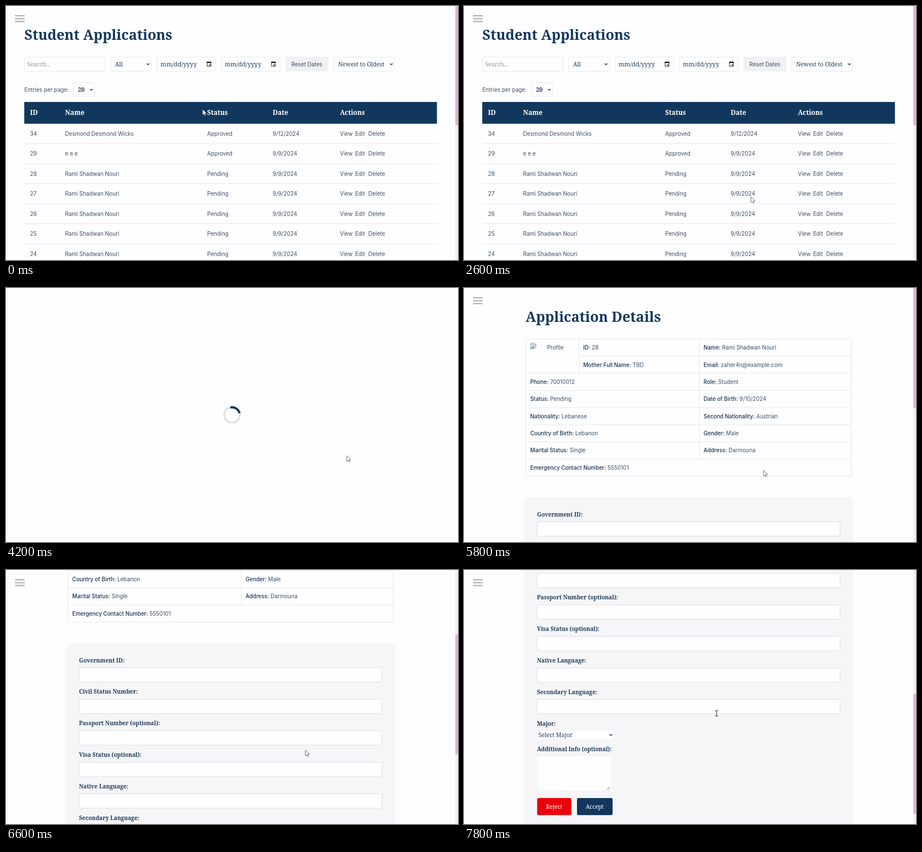
An HTML page for the animation above (8000 ms loop, 800 by 450 pixels).

```html
<!DOCTYPE html>
<html lang="en">
<head>
<meta charset="utf-8">
<title>Student Applications</title>
<style>
  html, body { margin: 0; width: 100%; height: 100%; overflow: hidden; background: #fefdff; }
  svg { display: block; width: 800px; height: 450px; }
  text { white-space: pre; }
  .sans { font: 400 9.75px Inter, sans-serif; fill: #3a5069; }
  .key { font-weight: 500; font-size: 9.7px; fill: #173352; }
  .serif { font: 400 10.25px "Noto Serif", serif; fill: #1f3e5f; }
  .title { font: 700 24.7px "Noto Serif", serif; fill: #12375e; }
  .head { font: 700 11.7px "Noto Serif", serif; fill: #fff; }
  .label { font: 700 9.92px "Noto Serif", serif; fill: #1f3e5b; }
  .hint { fill: #8f949c; }
  .date { font-size: 10.8px; }
  .count { font-weight: 600; font-size: 10.3px; }
  .button { font-size: 10px; font-weight: 500; fill: #fff; }
  .box { fill: #fefdff; stroke: #e9e8ec; }
  .field { fill: #fefdff; stroke: #e0dfe4; }
  .rule { stroke: #e8e7ec; fill: none; }
  .chevron { fill: none; stroke: #24364a; stroke-width: 1.3; }
  #panel { filter: drop-shadow(0 0 3px rgba(0, 0, 0, .1)); }
</style>
</head>
<body>
<svg id="stage" viewBox="0 0 800 450">
  <rect width="800" height="450" fill="#fefdff"/>
  <g id="list"></g>
  <g id="details"></g>
  <g id="chrome">
    <path d="M16 17.2H33M16 22.4H33M16 27.6H33" stroke="#b9b9bc" stroke-width="2.5"/>
    <rect x="795" width="5" height="450" fill="#f1f0f3"/>
    <rect id="thumb" x="795.3" width="4.7" rx="1.5" fill="#e4b1da"/>
  </g>
  <g id="loader" fill="none" stroke-width="3.8">
    <circle cx="400" cy="225" r="13.7" stroke="#e3e2e5"/>
    <path id="arc" d="M390.31 215.31A13.7 13.7 0 0 1 409.69 215.31" stroke="#0f365c"/>
  </g>
  <path id="arrow" d="M0 0V10.2L2.4 8.1L4 11.6L5.6 10.9L4.1 7.6H7.3Z" fill="#fff" stroke="#55555c" stroke-width=".8"/>
  <path id="beam" d="M-2.8 -4.8H-.8L0 -4.2L.8 -4.8H2.8M0 -4.2V4.2M-2.8 4.8H-.8L0 4.2L.8 4.8H2.8" fill="none" stroke="#222" stroke-width="1"/>
</svg>
<script>
const LOOP = 8000, STEP = 200;
const LOAD_START = 4000, LOAD_END = 5000;
const NAVY = '#11375d';
const $ = id => document.getElementById(id);

const text = (x, y, s, cls = 'sans', more = '') => `<text x="${x}" y="${y}" class="${cls}" ${more}>${s}</text>`;
const rect = (x, y, w, h, attrs) => `<rect x="${x}" y="${y}" width="${w}" height="${h}" ${attrs}/>`;
const line = (d, cls = 'rule') => `<path d="${d}" class="${cls}"/>`;
const chevron = (x, y) => line(`M${x - 2.4} ${y - 1.2}l2.4 2.4l2.4 -2.4`, 'chevron');
const box = (x, w, y = 90.5, h = 25) => rect(x, y, w, h, 'rx="2" class="box"');
const calendar = x => `<path d="M${x + .9} 99.4h7v7.4h-7z" fill="none" stroke="#111" stroke-width=".9"/>
  <path d="M${x + .5} 99h7.8v1.9h-7.8zM${x + 1.7} 98h1v1.5h-1zM${x + 6} 98h1v1.5h-1zM${x + 4.7} 103.6h1.9v1.9h-1.9z" fill="#111"/>`;

function listPage() {
  const student = 'Rami Shadwan Nouri';
  const rows = [
    [34, 'Desmond Desmond Wicks', 'Approved', '9/12/2024'],
    [29, 'e e e', 'Approved', '9/9/2024'],
    ...[28, 27, 26, 25, 24].map(id => [id, student, 'Pending', '9/9/2024'])
  ];
  const columns = [42.5, 104.5, 356, 472, 591];
  let s = text(32.5, 59.6, 'Student Applications', 'title');
  s += box(32.5, 143) + text(37.5, 106.7, 'Search...', 'serif hint');
  s += box(185.5, 72) + text(193, 106.7, 'All', 'serif') + chevron(251.5, 103);
  for (const x of [267.5, 381.5])
    s += box(x, 103.5) + text(x + 6, 106.9, 'mm/dd/yyyy', 'serif date') + calendar(x + 87.5);
  s += rect(495, 90, 75, 26, 'rx="2" fill="#f1f0f2"') + text(505, 106.7, 'Reset Dates');
  s += box(580.5, 107) + text(588, 106.7, 'Newest to Oldest', 'serif') + chevron(682, 103);
  s += text(32.5, 152.2, 'Entries per page:');
  s += box(119.5, 37, 136, 24.5) + text(127.5, 152, '20', 'serif count') + chevron(151, 148.2);
  s += rect(32.3, 170, 730.4, 38.6, `fill="${NAVY}"`);
  ['ID', 'Name', 'Status', 'Date', 'Actions'].forEach((h, i) => s += text(columns[i], 193.2, h, 'head'));
  rows.forEach((row, r) => {
    const y = 229.8 + r * 35.45;
    row.forEach((cell, i) => s += text(columns[i], y, cell));
    s += text(591, y, 'View') + text(618, y, 'Edit') + text(641.3, y, 'Delete');
    s += line(`M32.5 ${y + 14}H762.5`);
  });
  return s;
}

function detailsPage() {
  const pitch = 30.37, top = 90.5;
  const pair = (x, row, key, value) =>
    text(x, 109.2 + row * pitch, `<tspan class="key">${key}:</tspan> ${value}`);
  const left = [['Phone', '70010012'], ['Status', 'Pending'], ['Nationality', 'Lebanese'],
    ['Country of Birth', 'Lebanon'], ['Marital Status', 'Single'], ['Emergency Contact Number', '5550101']];
  const right = [['Name', 'Rami Shadwan Nouri'], ['Email', 'zaher4n@example.com'], ['Role', 'Student'],
    ['Date of Birth', '9/10/2024'], ['Second Nationality', 'Austrian'], ['Gender', 'Male'], ['Address', 'Darmouna']];
  let s = text(109, 59.6, 'Application Details', 'title');
  for (let i = 0; i < 9; i++)
    s += line(`M${i === 1 ? 203.5 : 109.5} ${top + i * pitch}H685.5`);
  s += line(`M109.5 ${top}V333.5M685.5 ${top}V333.5M203.5 ${top}v${2 * pitch}M416.5 ${top}v${7 * pitch}`);

  // Missing-image icon with its alt text
  s += `<path d="M118 98h6.5l3 3v3l-3.5 3.5l-2.5 -1l-3.5 2z" fill="#c5d8f4" stroke="#8e959c" stroke-width=".8"/>
    <path d="M118.4 107.6l3.6 -4l2.6 2.6l-1 1l-2 -.8z" fill="#5aa65c"/><path d="M124.3 98v3.2h3.2z" fill="#fff" stroke="#8e959c" stroke-width=".6"/>`;
  s += text(161.7, 109.2, 'Profile', 'sans', 'text-anchor="middle"');
  s += pair(211, 0, 'ID', '28') + pair(211, 1, 'Mother Full Name', 'TBD');
  left.forEach(([k, v], i) => s += pair(117.3, i + 2, k, v));
  right.forEach(([k, v], i) => s += pair(424, i, k, v));

  s += rect(109.5, 373.5, 576, 545, 'id="panel" rx="4" fill="#f6f5f7"');
  ['Government ID', 'Civil Status Number', 'Passport Number (optional)', 'Visa Status (optional)',
    'Native Language', 'Secondary Language'].forEach((name, i) => {
    const y = i * 55.87;
    s += text(129.3, 404.6 + y, name + ':', 'label');
    s += rect(129.5, 414 + y, 536, 25.5, 'rx="2" class="field"');
  });
  s += text(129.3, 739.8, 'Major:', 'label') + rect(129.5, 749, 136.5, 14.5, 'fill="#fefdff"');
  s += text(131.8, 760, 'Select Major', 'serif') + chevron(260, 756.2);
  s += text(129.3, 784.8, 'Additional Info (optional):', 'label') + rect(129.5, 794, 130, 60, 'fill="#fefdff"');
  s += '<path d="M253 853.2l5 -5M256 853.2l2 -2" stroke="#55575c" stroke-width=".8"/>';
  s += rect(129.5, 868, 60.5, 30.3, 'rx="2.5" fill="#ea000c"') + text(159.7, 886.6, 'Reject', 'serif button', 'text-anchor="middle"');
  s += rect(200, 868, 63, 30.3, `rx="2.5" fill="${NAVY}"`) + text(231.3, 886.6, 'Accept', 'serif button', 'text-anchor="middle"');
  return s;
}

// Each row: time, then values
const pointer = [[0, 348, 183], [800, 418, 252], [1000, 418, 252], [2200, 506, 336], [2600, 508, 338],
  [3400, 601, 298], [4200, 603, 297], [4800, 603, 297], [5600, 530, 323], [5800, 530, 323],
  [6600, 530, 319], [6800, 526, 315], [7200, 440, 247], [7600, 447, 254], [8000, 447, 254]];
const scroll = [[0, 0], [5800, 0], [6000, 45], [6600, 241], [6800, 292], [7000, 322], [7200, 330],
  [7400, 385], [7600, 448], [7800, 464], [8000, 464]];

function at(table, t) {
  const i = Math.max(1, table.findIndex(row => row[0] >= t));
  const a = table[i - 1], b = table[i], k = (t - a[0]) / (b[0] - a[0]);
  return a.slice(1).map((v, j) => v + (b[j + 1] - v) * k);
}

const show = (id, on) => $(id).setAttribute('display', on ? 'inline' : 'none');
const move = (id, x, y) => $(id).setAttribute('transform', `translate(${x} ${y})`);

function draw(t) {
  const loading = t >= LOAD_START && t < LOAD_END;
  const opened = t >= LOAD_END;
  const [x, y] = at(pointer, t);
  const [top] = at(scroll, t);
  show('list', t < LOAD_START);
  show('details', opened);
  show('chrome', !loading);
  show('loader', loading);
  show('beam', t >= 7600);
  show('arrow', t < 7600);
  move('details', 0, -top);
  move('arrow', x, y);
  move('beam', x, y);
  $('thumb').setAttribute('y', top * .473);
  $('thumb').setAttribute('height', opened ? 212.5 : 211);
  $('arc').setAttribute('transform', `rotate(${(t - 4111) * .36} 400 225)`);
}

$('list').innerHTML = listPage();
$('details').innerHTML = detailsPage();
const start = performance.now();
function tick() {
  const t = (performance.now() - start) % LOOP;
  draw(Math.floor(t / STEP) * STEP);
  requestAnimationFrame(tick);
}
tick();
</script>
</body>
</html>
```
